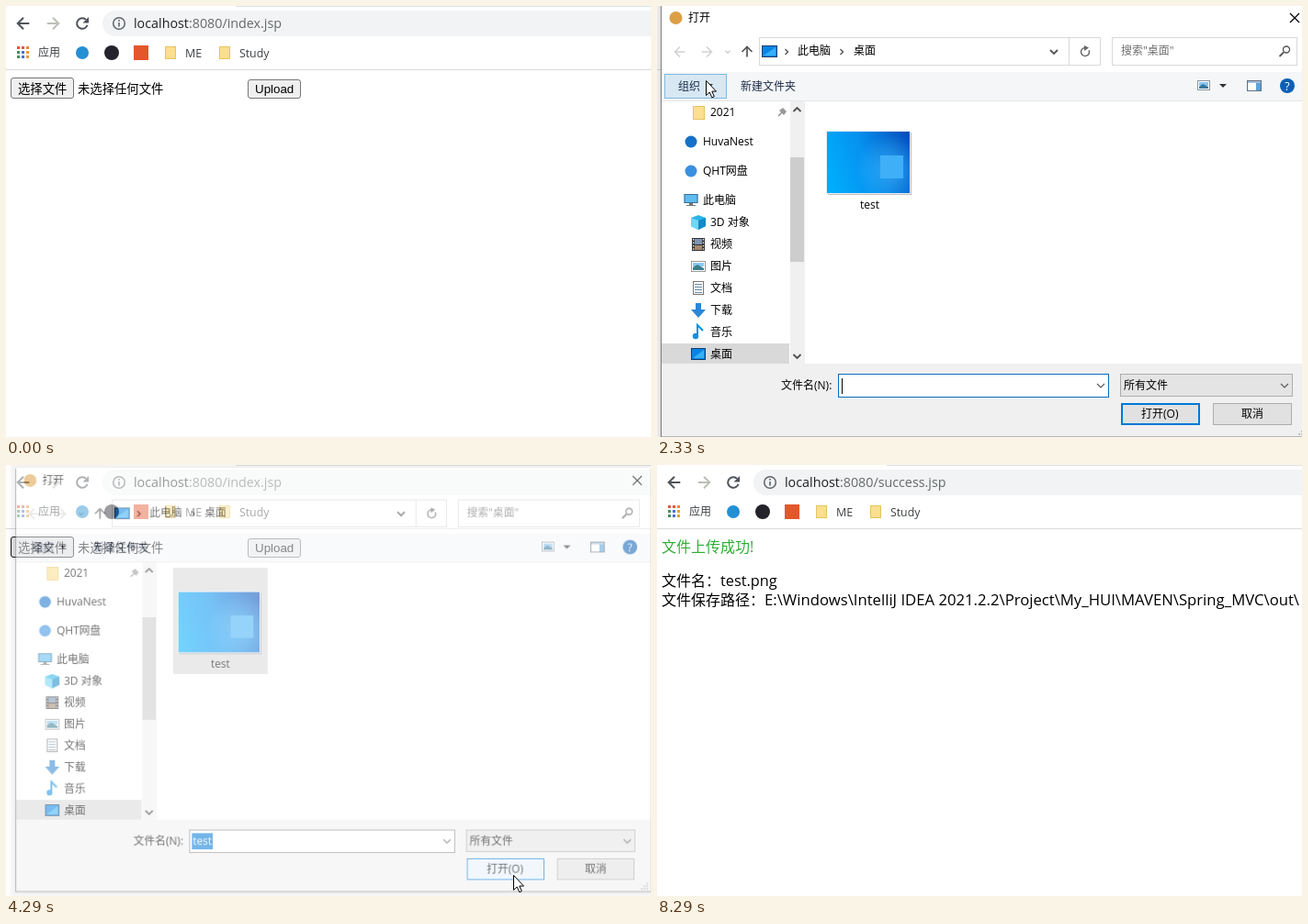
These frames come from a looping animation (702x470 px, 8820 ms). An HTML page with a canvas:

```html
<!DOCTYPE html>
<html lang="zh">
<head>
<meta charset="utf-8">
<title>File upload</title>
<style>
html, body { margin: 0; width: 100%; height: 100%; overflow: hidden; background: #fff; }
canvas { display: block; }
</style>
</head>
<body>
<canvas id="stage" width="702" height="470"></canvas>
<script>
const LOOP = 8820;
const UI = '"Open Sans", "Noto Sans CJK SC", "Noto Sans CJK", sans-serif';
const ARIAL = '"Liberation Sans", "Noto Sans CJK SC", "Noto Sans CJK", sans-serif';
const screen = document.getElementById('stage').getContext('2d');
const layer = document.createElement('canvas');
layer.width = 720;
layer.height = 480;
const sheet = layer.getContext('2d');
let c = screen;

// ---- drawing helpers ----
function text(s, x, cy, size = 12, color = '#000', font = UI) {
  c.font = size + 'px ' + font;
  c.fillStyle = color;
  c.fillText(s, x, cy + size * 0.37);
  return x + c.measureText(s).width;
}
function rect(x, y, w, h, fill) {
  c.fillStyle = fill;
  c.fillRect(x, y, w, h);
}
function box(x, y, w, h, fill, edge, line = 1) {
  rect(x, y, w, h, fill);
  c.strokeStyle = edge;
  c.lineWidth = line;
  c.strokeRect(x + line / 2, y + line / 2, w - line, h - line);
}
function round(x, y, w, h, r, fill, edge) {
  c.beginPath();
  c.roundRect(x, y, w, h, r);
  c.fillStyle = fill;
  c.fill();
  if (edge) {
    c.strokeStyle = edge;
    c.lineWidth = 1;
    c.stroke();
  }
}
function disc(x, y, r, fill) {
  c.beginPath();
  c.arc(x, y, r, 0, 7);
  c.fillStyle = fill;
  c.fill();
}
function arc(x, y, r, from, to, color, width) {
  c.beginPath();
  c.arc(x, y, r, from, to);
  c.strokeStyle = color;
  c.lineWidth = width;
  c.stroke();
}
function trace(pts) {
  c.beginPath();
  for (let i = 0; i < pts.length; i += 2) c.lineTo(pts[i], pts[i + 1]);
}
function line(pts, color, width = 1) {
  trace(pts);
  c.strokeStyle = color;
  c.lineWidth = width;
  c.stroke();
}
function shape(pts, fill) {
  trace(pts);
  c.closePath();
  c.fillStyle = fill;
  c.fill();
}
function arrow(x, y, angle, size, color, width) {
  c.save();
  c.translate(x, y);
  c.rotate(angle);
  line([-size, 0, size, 0], color, width);
  line([0, -size, size, 0, 0, size], color, width);
  c.restore();
}
function chevron(x, y, angle, size, color, width = 1.4) {
  c.save();
  c.translate(x, y);
  c.rotate(angle);
  line([-size / 2, -size, size / 2, 0, -size / 2, size], color, width);
  c.restore();
}
function cross(x, y, r, color, width) {
  line([x - r, y - r, x + r, y + r], color, width);
  line([x - r, y + r, x + r, y - r], color, width);
}
const DOWN = Math.PI / 2;

// ---- pointer ----
// start, end, number of positions, x, y
const MOVES = [
  [70, 200, 3, 377, 269],
  [470, 1050, 9, 53, 81],
  [2410, 2610, 4, 235, 150],
  [3000, 3130, 3, 305, 210],
  [3200, 3690, 8, 552, 447],
  [4690, 5360, 11, 302, 95],
  [6690, 7540, 13, 679, 224],
  [7610, 7740, 3, 664, 190],
  [7810, 8290, 8, 690, 480]
];
const CLICKS = [[1120, 1260], [2810, 2950], [3750, 3880], [5560, 5690]];

function stepped(t, a, b, n) {
  const k = Math.floor((t - a) / (b - a) * (n - 1) + 1e-6);
  return Math.max(0, Math.min(k, n - 1));
}
function pointer(t) {
  let x = 572, y = 512;
  for (const [a, b, n, tx, ty] of MOVES) {
    if (t < a) break;
    let p = (stepped(t, a, b, n) + 1) / n;
    if (n > 4) p = p * p * (3 - 2 * p);
    x += (tx - x) * p;
    y += (ty - y) * p;
  }
  return { x: Math.round(x), y: Math.round(y) };
}
function inside(m, x, y, w, h) {
  return m.x >= x && m.x < x + w && m.y >= y && m.y < y + h;
}
function drawPointer(t, m) {
  if (t < 70 || t >= 8290) return;
  if (CLICKS.some(([a, b]) => t >= a && t < b)) {
    c.globalCompositeOperation = 'multiply';
    disc(m.x, m.y, 12, '#f8f760');
    c.globalCompositeOperation = 'source-over';
  }
  if (t >= 1530 && t < 1790) {
    const turn = stepped(t, 1530, 1790, 4) * 1.6;
    arc(67.5, 81.5, 6.5, 0, 7, '#9fd0f2', 3);
    arc(67.5, 81.5, 6.5, turn, turn + 2, '#1c7fd0', 3);
  }
  c.save();
  c.translate(m.x + 0.5, m.y + 0.5);
  trace([0, 0, 0, 16, 3.7, 12.6, 6.3, 18.3, 8.8, 17.2, 6.3, 11.6, 11, 11.6]);
  c.closePath();
  c.fillStyle = '#fff';
  c.fill();
  c.strokeStyle = '#000';
  c.lineWidth = 1;
  c.stroke();
  c.restore();
}

// ---- browser ----
function folder(x, y, w = 12, h = 14) {
  box(x, y, w, h, '#fbdf8f', '#e6c363');
}
function browser(t, m) {
  const done = t >= 6160;
  rect(0, 0, 702, 470, '#fff');
  rect(250, 0, 452, 1, '#dee1e6');
  arrow(19, 19, Math.PI, 6.3, '#50545a', 2);
  arrow(51, 19, 0, 6.3, '#bcc0b8', 2);
  if (t >= 5690 && t < 6230) cross(83, 19, 5, '#50545a', 2);
  else {
    arc(83, 19, 5.8, 0.3, 5.5, '#50545a', 2);
    shape([90, 12, 90, 18.5, 83.5, 18.5], '#50545a');
  }
  round(105, 5, 640, 28, 14, '#f1f3f4');
  arc(123, 19, 6.3, 0, 7, '#5f6368', 1.5);
  rect(122.2, 18, 1.6, 4.5, '#5f6368');
  rect(122.2, 15, 1.6, 1.7, '#5f6368');
  const end = text('localhost', 139, 19, 14.3, '#202124');
  text(':8080/' + (done ? 'success' : 'index') + '.jsp', end, 19, 14.3, '#66696a');

  const dots = ['#e4573d', '#e4573d', '#e88a3a', '#4a8f5c', '#4a6fd8', '#e8a03a'];
  for (let i = 0; i < 9; i++)
    rect(12 + i % 3 * 5, 44 + Math.floor(i / 3) * 5, 3, 3, dots[i < 6 ? i : i - 3]);
  text('应用', 35, 51, 12, '#3c4043');
  disc(83, 51, 7, '#258fd4');
  disc(115, 51, 8, '#24222a');
  rect(139, 43, 16, 16, '#e5562c');
  folder(173, 44);
  text('ME', 195, 51, 12.5, '#3c4043');
  folder(232, 44);
  text('Study', 254, 51, 12.3, '#3c4043');
  rect(0, 69, 702, 1, '#d9dbde');

  if (done) {
    text('文件上传成功!', 5, 89, 16, '#31ad38');
    text('test.png', text('文件名：', 5, 126, 16), 126, 16.3);
    text('E:\\Windows\\IntelliJ IDEA 2021.2.2\\Project\\My_HUI\\MAVEN\\Spring_MVC\\out\\',
      text('文件保存路径：', 5, 147, 16), 147, 16.7);
    return;
  }
  const focus = t >= 1120 && t < 4690;
  const over = t < 2000 && inside(m, 5, 78, 69, 23);
  round(5.5, 78.5, 68, 22, 2.5, focus || over ? '#e3e3e3' : '#efefef', focus ? '#151515' : '#767676');
  text('选择文件', 13, 90, 13.333, '#000', ARIAL);
  text(t >= 4690 ? 'test.png' : '未选择任何文件', 78, 90, 13.333, '#000', ARIAL);
  round(263.5, 80.5, 57, 20, 2.5, '#efefef', t >= 5690 ? '#151515' : '#767676');
  text('Upload', 271, 90.5, 13.333, '#000', ARIAL);
}

// ---- file dialog ----
function monitor(x, y, w, h) {
  box(x, y, w, h, '#0a84e4', '#123f70');
  shape([x + 2, y + h - 2, x + w - 2, y + 2, x + w - 2, y + h - 2], '#35b0f5');
}
function sidebar() {
  rect(5, 368, 139, 22, '#d9d9d9');
  folder(39, 109, 13, 15);
  line([132, 120, 136, 116], '#888', 1.2);
  shape([133, 114, 137, 111, 141, 115, 138, 119], '#999');
  disc(37, 148, 6.5, '#1470c8');
  disc(37, 180, 6.5, '#3a90e0');
  box(29.5, 205, 15, 10, '#5fbcf0', '#3c6f94');
  rect(35, 215, 4, 2, '#777');
  rect(32, 217, 10, 1, '#777');
  shape([37, 231, 45, 228, 53, 231, 53, 240, 45, 244, 37, 240], '#29b5e8');
  shape([37, 231, 45, 234, 45, 244, 37, 240], '#6fd6f5');
  shape([45, 234, 53, 231, 53, 240, 45, 244], '#1589c8');
  rect(38, 253, 14, 14, '#333');
  rect(41, 254, 8, 6, '#7d95b5');
  rect(41, 261, 8, 5, '#a58a70');
  for (let i = 0; i < 4; i++) {
    rect(39, 254 + i * 3.4, 1.3, 1.6, '#eee');
    rect(49.8, 254 + i * 3.4, 1.3, 1.6, '#eee');
  }
  box(37, 278, 16, 12, '#fff', '#999');
  rect(39, 280, 12, 4, '#8cc9f2');
  shape([39, 288, 39, 285, 44, 282, 51, 286, 51, 288], '#3c7f8c');
  box(39, 300, 12, 15, '#fff', '#777');
  for (let i = 0; i < 4; i++) rect(41, 303 + i * 3, 8, 1, '#688aa5');
  shape([42, 324, 48, 324, 48, 331, 53, 331, 45, 340, 37, 331, 42, 331], '#2f86d2');
  line([44, 359, 44, 348, 50, 354], '#1590e0', 2);
  disc(42, 360, 3.2, '#1590e0');
  monitor(37, 373, 16, 13);

  text('2021', 58, 116);
  ['HuvaNest', 'QHT网盘', '此电脑'].forEach((s, i) => text(s, 50, 148 + i * 32));
  ['3D 对象', '视频', '图片', '文档', '下载', '音乐', '桌面']
    .forEach((s, i) => text(s, 58, 236 + i * 24));
  rect(145, 104, 16, 286, '#f0f0f0');
  rect(145, 165, 15, 114, '#cdcdcd');
  chevron(152.5, 113, -DOWN, 4, '#505050', 1.8);
  chevron(152.5, 382, DOWN, 4, '#505050', 1.8);
}
function thumbnail(t, m) {
  if (t >= 4150) rect(179, 110, 105, 118, '#d9d9d9');
  else if (t >= 2810) box(179, 110, 105, 118, '#cce8ff', '#99d1ff');
  else if (inside(m, 179, 110, 105, 118)) rect(179, 110, 105, 118, '#e5f3ff');
  rect(186, 138, 91, 68, 'rgba(0,0,0,.25)');
  rect(184, 136, 92, 69, '#e8eef4');
  const sky = c.createLinearGradient(185, 180, 275, 150);
  sky.addColorStop(0, '#00adfc');
  sky.addColorStop(0.45, '#0692f0');
  sky.addColorStop(1, '#0450bd');
  rect(185, 137, 90, 67, sky);
  const glow = c.createRadialGradient(254, 178, 2, 254, 178, 38);
  glow.addColorStop(0, 'rgba(70,190,255,.6)');
  glow.addColorStop(1, 'rgba(70,190,255,0)');
  rect(185, 137, 90, 67, glow);
  rect(243, 163, 25, 25, '#3fb0f8');
  text('test', 221, 217);
}
function toolbar(t, m) {
  const navy = '#1c2b49';
  rect(5, 72, 704, 31, '#f5f6f7');
  rect(5, 103, 704, 1, '#e6e7e8');
  if (inside(m, 8, 74, 68, 27)) box(8, 74, 68, 27, '#d8e8f3', '#80b9dd');
  text('组织', 23, 88, 12, navy);
  shape([53, 85, 61, 85, 57, 89], '#333');
  text('新建文件夹', 91, 88, 12, navy);
  box(588, 81, 14, 11, '#fff', '#8a939c');
  rect(590, 83, 10, 4, '#8cc5ee');
  shape([590, 90, 590, 88, 594, 85, 600, 88, 600, 90], '#37789c');
  shape([612, 85, 620, 85, 616, 89], '#333');
  box(642, 81, 16, 12, '#fff', '#5f7084');
  rect(643, 82, 14, 2, '#a5bed4');
  rect(652, 84, 5, 8, '#5ba2dc');
  disc(686, 87, 8, '#0b5fb5');
  text('?', 683.2, 87, 12.5, '#fff');
}
function addressRow() {
  arrow(25, 50, Math.PI, 5.5, '#d0d0d0', 1.5);
  arrow(54, 50, 0, 5.5, '#d0d0d0', 1.5);
  chevron(77, 50, DOWN, 2.5, '#ccc');
  arrow(98, 50, -DOWN, 5.5, '#555', 1.7);
  box(111, 34, 372, 31, '#fff', '#d9d9d9');
  rect(448, 35, 1, 29, '#d9d9d9');
  monitor(114, 43, 17, 13);
  chevron(141, 50, 0, 3, '#555');
  text('此电脑', 153, 49);
  chevron(201, 50, 0, 3, '#555');
  text('桌面', 214, 49);
  chevron(432, 50, DOWN, 4, '#555', 1.8);
  arc(466, 50, 4.5, -0.4, 4.7, '#666', 1.5);
  shape([465, 43, 470, 45.5, 465, 49], '#666');
  box(495, 34, 202, 31, '#fff', '#d9d9d9');
  text('搜索"桌面"', 505, 49, 12, '#6d6d6d');
  arc(685, 47.5, 3.5, 0, 7, '#555', 1.4);
  line([682, 50.5, 677.5, 55], '#555', 1.8);
}
function footer(t, m) {
  rect(5, 390, 704, 80, '#f0f0f0');
  text('文件名(N):', 135, 414);
  const leaving = t >= 4150;
  box(197, 401, 295, 26, '#fff', leaving ? '#8a8a8a' : '#0a6cbd');
  if (leaving) rect(200, 405, 23, 18, '#0078d7');
  if (t >= 2810) text('test', 201, 414, 12, leaving ? '#fff' : '#000');
  else rect(201, 406, 1, 17, '#000');
  chevron(483, 414, DOWN, 4, '#555', 1.1);
  box(504, 401, 188, 25, '#e4e4e4', '#adadad');
  text('所有文件', 508, 414);
  chevron(683, 414, DOWN, 4, '#555', 1.1);
  const over = inside(m, 505, 433, 86, 24);
  box(505, 433, 86, 24, over ? '#e5f1fb' : '#e1e1e1', '#0078d7', over ? 1 : 2);
  text('打开(O)', 527, 445);
  box(605, 433, 86, 24, '#e1e1e1', '#adadad');
  text('取消', 636, 445);
  for (let i = 0; i < 3; i++)
    for (let j = 0; j <= i; j++) rect(704 - j * 3, 460 + i * 3, 2, 2, '#bfbfbf');
}
function blankFooter() {
  rect(5, 390, 704, 80, '#f0f0f0');
  rect(136, 406, 57, 16, '#fff');
  rect(197, 400, 296, 27, '#fff');
  rect(504, 400, 189, 26, '#fff');
  rect(504, 431, 88, 26, '#fff');
  rect(604, 431, 89, 26, '#fff');
  rect(694, 453, 14, 16, '#fff');
}
function dialog(t, m) {
  c = sheet;
  c.clearRect(0, 0, 720, 480);
  rect(4, 0, 706, 470, '#fff');
  disc(20.5, 13, 7, '#dc9f45');
  text('打开', 34, 13);
  cross(694, 13, 5, '#000', 1.2);
  if (t < 2060) blankFooter();
  else {
    addressRow();
    toolbar(t, m);
    sidebar();
    thumbnail(t, m);
    footer(t, m);
  }
  c.strokeStyle = '#7d7d7d';
  c.lineWidth = 1;
  c.strokeRect(4.5, -0.5, 705, 470.5);
  c = screen;
}
function drawDialog(t, m) {
  if (t < 2000 || t >= 4420) return;
  const left = 1 - stepped(t, 2000, 2270, 5) / 4;
  let alpha = 1 - 0.7 * left * left;
  let scale = 1 - 0.034 * left * left;
  if (t >= 4230) {
    const k = Math.min(3, Math.floor((t - 4230) / 60) + 1);
    alpha = 1 - 0.225 * k;
    scale = 1 - 0.0095 * k;
  }
  dialog(t, m);
  c.save();
  c.translate(325, 218);
  c.scale(scale, scale);
  c.translate(-325, -218);
  c.globalAlpha = alpha;
  c.lineWidth = 1;
  for (let i = 1; i < 9; i++) {
    c.strokeStyle = `rgba(0,0,0,${0.13 * (1 - i / 9)})`;
    c.strokeRect(4.5 - i, -0.5 - i, 705 + 2 * i, 470.5 + 2 * i);
  }
  c.drawImage(layer, 0, 0);
  c.restore();
}

function frame(now) {
  const t = now % LOOP;
  const m = pointer(t);
  browser(t, m);
  drawDialog(t, m);
  drawPointer(t, m);
}
const start = performance.now();
function tick() {
  frame(performance.now() - start);
  requestAnimationFrame(tick);
}
tick();
</script>
</body>
</html>
```
